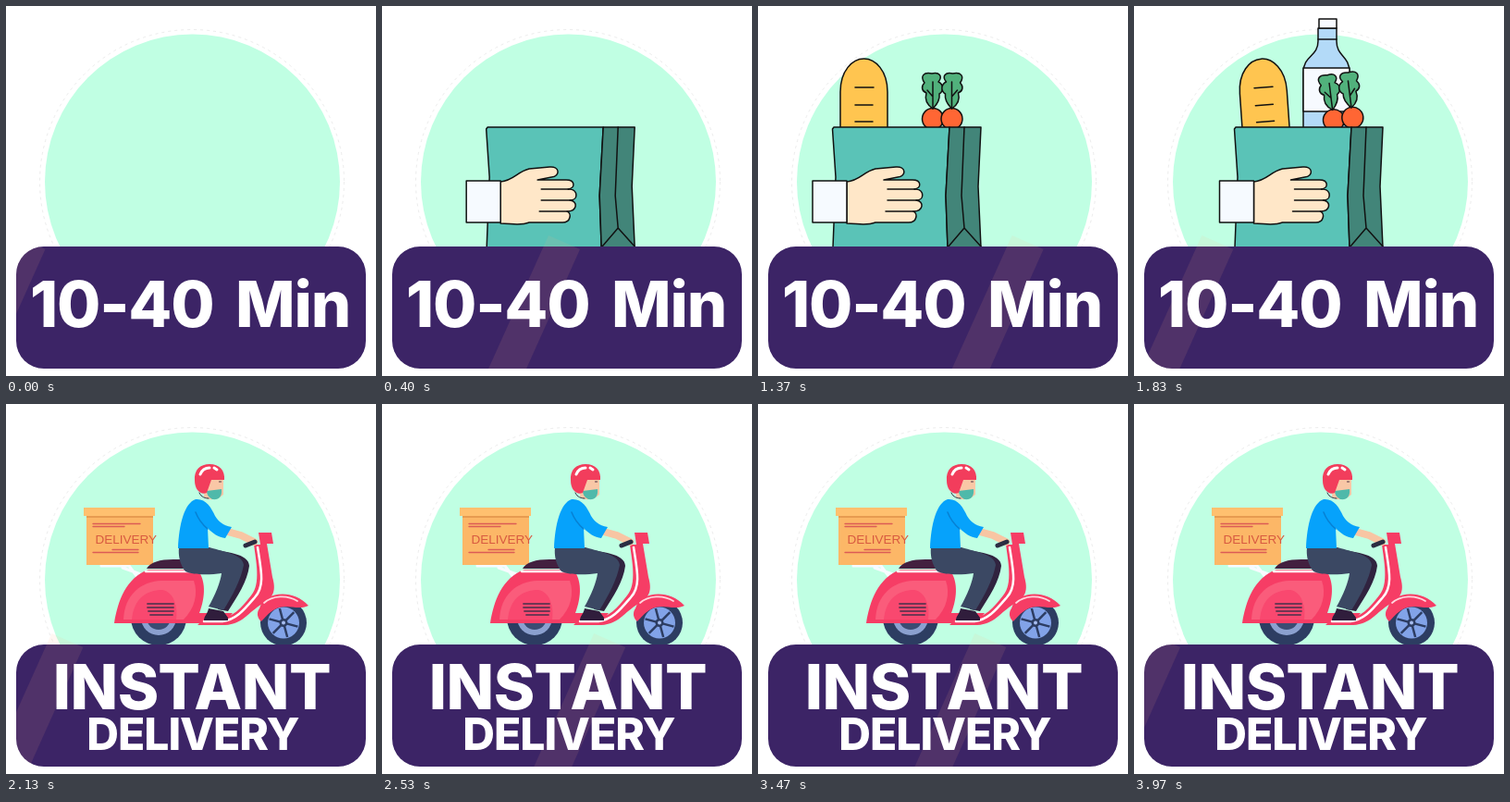
An HTML page that plays this animation: 400 by 400 pixels, repeating every 4010 ms.

```html
<!DOCTYPE html>
<html lang="en">
<head>
<meta charset="utf-8">
<title>Instant delivery</title>
<style>
  html, body { margin: 0; width: 100%; height: 100%; overflow: hidden; background: #fff; }
  svg { display: block; width: 100%; height: 100%; }
  .title { font-family: Inter, "Open Sans", sans-serif; font-weight: 800; fill: #fff; }
  .ink { stroke: #111; stroke-width: 1.5; stroke-linejoin: round; stroke-linecap: round; }
  .line { fill: none; stroke-linecap: round; stroke-linejoin: round; }
</style>
</head>
<body>
<svg viewBox="0 0 400 400">
  <defs>
    <clipPath id="shineArea"><path d="M41 240H389V362A30 30 0 0 1 359 392H41A30 30 0 0 1 11 362V290A30 30 0 0 1 41 260Z"/></clipPath>
    <clipPath id="aboveBanner"><rect width="400" height="262"/></clipPath>
    <g id="carrot">
      <circle cx="247" cy="122" r="11.5" fill="#ff6634"/>
      <path d="M247 111C241 107 238 101 240 94C235 92 234 87 238 83C233 76 237 71 246 73C254 71 258 76 253 82C259 85 259 92 254 95C255 102 251 107 247 111Z" fill="#51b17c"/>
      <path d="M247 82V111M241 91L247 98" fill="none"/>
    </g>
  </defs>

  <circle cx="201" cy="190" r="164.5" fill="none" stroke="#ececec" stroke-dasharray="3 4"/>
  <circle cx="201.500" cy="190" r="159.500" fill="#c0ffe3"/>

  <g id="groceries" clip-path="url(#aboveBanner)">
    <g id="bag" class="ink">
      <g id="bottle">
        <path d="M213 132V72C213 53 229 55 229 38V24H249V38C249 55 263 53 263 72V132Z" fill="#b3daf8"/>
        <path d="M213 67H263V114H213Z" fill="#f7faff"/>
        <path d="M230 14H249V24H230Z" fill="#f7faff"/>
        <path d="M229 36H249" fill="none"/>
      </g>
      <g id="bread">
        <path d="M147 134V93C147 70 160 57 172.500 57S198 70 198 93V134Z" fill="#ffc550"/>
        <path d="M163 88H183M163 107H182M163 125H182" fill="none"/>
      </g>
      <g id="carrots"><use href="#carrot"/><use href="#carrot" transform="matrix(-1 0 0 1 514.500 0)"/></g>
      <path d="M140 131H265L261 205 263 261H139L142 185 138.500 133Z" fill="#5ac3b7"/>
      <path d="M265 131H299L296 195 299 261H263L261 205Z" fill="#428579"/>
      <path d="M281 131L278 205 281 240M263 261L281 240 299 260" fill="none"/>
      <g id="hand">
        <path d="M154 190C168 189 172 179 185 176L207 174C218 173 219 184 209 185L194 188H225C235 188 235 197 227 198H229C238 199 238 210 229 210C238 211 237 222 226 222C231 224 230 234 221 234H185C175 238 165 235 154 235Z" fill="#ffe7c8"/>
        <path d="M198 198H228M198 210H230M196 222H226" fill="none"/>
        <path d="M117 189H154V234H117Z" fill="#f6faff"/>
      </g>
    </g>
  </g>

  <g id="scooter">
    <path class="line" d="M103 175H133L145 191M126 177L154 187" stroke="#f8fbff" stroke-width="3"/>
    <path d="M87 120H159V174H87Z" fill="#fcb767"/>
    <path d="M84 112H161V121H84Z" fill="#ffc06f"/>
    <path d="M87 121H159V123H87Z" fill="#e79b50"/>
    <path class="line" d="M94 129.500H145M94 132.500H128M94 160.500H143M115 157.500H143" stroke="#dc5c55" stroke-width="1.300"/>
    <text x="96.500" y="151" font-family="'Liberation Sans', Arial, sans-serif" font-size="13.500" fill="#d85a40">DELIVERY</text>

    <circle cx="165" cy="231" r="30" fill="#2d3d62"/>
    <circle cx="165" cy="231" r="19" fill="#8ba0cf"/>
    <circle cx="165" cy="231" r="13" fill="#3b4c73"/>
    <path d="M117 237C121 212 130 188 154 179H207C216 190 216 208 209 226H245L236 237Z" fill="#f63d65"/>
    <path d="M127 233C128 207 145 192 168 191H203C208 205 204 221 192 233Z" fill="#fa5c7b"/>
    <path d="M136 233C138 211 151 201 169 201C181 203 186 218 184 233Z" fill="#f9486f"/>
    <path class="line" d="M153 216H181M153 220H181M154 224H181M156 228H180" stroke="#713653" stroke-width="1.800"/>
    <path d="M152 178C156 171 166 168 181 168H214V178Z" fill="#43203f"/>
    <path class="line" d="M151 181H204" stroke="#fff" stroke-width="2.500"/>

    <circle cx="300" cy="236.500" r="25" fill="#2d3d62"/>
    <circle cx="300" cy="236.500" r="17" fill="#82a3e8"/>
    <g id="spokes" stroke="#2d3d62" stroke-width="2.500"></g>
    <circle cx="300" cy="236.500" r="4.500" fill="#2d3d62"/>
    <circle cx="300" cy="236.500" r="2" fill="#a7bdf0"/>
    <path d="M273 139H287L289 151H282L288 187C292 201 290 209 277 216C262 225 256 238 237 239H207L213 233H230C245 231 255 220 265 207C276 195 270 168 268 152H275Z" fill="#f63d65"/>
    <path class="line" d="M272 155C276 180 280 197 269 209C257 223 249 233 234 235H214" stroke="#fff" stroke-width="2.500"/>
    <path d="M274 221C279 203 310 199 327 218C318 222 311 219 302 219C289 219 283 228 276 235C271 231 271 225 274 221Z" fill="#f63d65"/>
    <path class="line" d="M279 215C288 207 304 206 315 213" stroke="#ffd5dd" stroke-width="1.800"/>

    <path d="M216 157C237 159 263 162 263 175C261 192 250 208 240 224L229 222C242 198 251 182 244 173Z" fill="#30233f"/>
    <path d="M187 155H220C237 160 256 163 257 174C254 190 245 207 235 223L219 219C226 207 232 192 233 183C220 185 202 185 194 181C188 174 186 163 187 155Z" fill="#3b4863"/>
    <path d="M219 221L235 224 240 231V234H214C214 229 218 227 219 221Z" fill="#301d3c"/>
    <path class="line" d="M236 137L254 142 268 149" stroke="#f8c5a3" stroke-width="8"/>
    <path class="line" d="M259 153L269 149" stroke="#2b2d42" stroke-width="5"/>
    <path d="M205 103C193 107 187 130 186 156H219L218 134C223 140 230 144 237 145L244 133C234 131 230 127 226 121C222 112 216 102 205 103Z" fill="#06a2fb"/>
    <path class="line" d="M205 117C208 125 212 130 218 135" stroke="#0780d3" stroke-width="1.500"/>
    <path d="M215 80H235V98C229 104 218 105 214 100Z" fill="#f9c7a6"/>
    <path d="M230 84H233" stroke="#4c3444"/>
    <path d="M217 94L233 92C234 100 230 104 223 103C219 101 217 98 217 94Z" fill="#4fb9aa"/>
    <path d="M204 83C203 71 210 65 220 65C231 65 237 72 236 82L222 82 217 96C210 99 204 92 204 83Z" fill="#f23d5c"/>
    <path class="line" d="M210 76C212 71 216 69 220 69M225 69L228 71" stroke="#fff" stroke-width="3"/>
    <path class="line" d="M209 96C211 101 216 102 219 102" stroke="#2b2d42"/>
  </g>

  <rect x="11" y="260" width="378" height="132" rx="30" fill="#3c2466"/>
  <g clip-path="url(#shineArea)"><path id="shine" d="M0 248L34 263L-32 410L-73 410Z" fill="#ffb080" opacity=".1"/></g>

  <g id="timeTitle" class="title" font-size="68.500" letter-spacing="-1.200">
    <text x="26" y="347">10-40</text>
    <text x="372" y="347" text-anchor="end">Min</text>
  </g>
  <g id="deliveryTitle" class="title" text-anchor="middle">
    <text x="201" y="330" font-size="67.500" letter-spacing="-.5">INSTANT</text>
    <text x="202" y="374" font-size="48" letter-spacing="-1">DELIVERY</text>
  </g>
</svg>

<script>
const LOOP = 4010;
const CUT = 2000;
const $ = id => document.getElementById(id);

const SHINE = [[0, 8], [1000, 437], [2010, -5], [3000, 440], [LOOP, -1]];
const BAG_X = [[300, -30], [730, 0], [1260, -58], [1520, -58], [1830, -30]];
const LEAN = [[1560, 0], [1800, -1], [1850, -1], [2000, 0]];

const linear = p => p;
const smooth = p => p * p * (3 - 2 * p);
const clamp = p => Math.min(1, Math.max(0, p));

function track(keys, t, ease = smooth) {
  if (t <= keys[0][0]) return keys[0][1];
  const i = keys.findIndex(([time]) => time > t);
  if (i < 0) return keys[keys.length - 1][1];
  const [t0, a] = keys[i - 1], [t1, b] = keys[i];
  return a + (b - a) * ease((t - t0) / (t1 - t0));
}

function place(id, x, y, turn = "") {
  $(id).setAttribute("transform", `translate(${x} ${y}) ${turn}`);
}

function show(id, on) {
  $(id).style.display = on ? "" : "none";
}

// Items appear near the top edge and fall into the bag.
function drop(id, t, start, end, height, turn) {
  const p = clamp((t - start) / (end - start));
  show(id, t >= start);
  place(id, 0, -height * (1 - p * p), turn);
}

function render(t) {
  const delivery = t >= CUT;
  show("groceries", !delivery && t >= 30);
  show("timeTitle", !delivery);
  show("scooter", delivery);
  show("deliveryTitle", delivery);
  place("shine", track(SHINE, t, linear), 0);
  if (delivery) return;

  const lean = track(LEAN, t);
  const rise = clamp((t - 30) / 300);
  place("bag", track(BAG_X, t), 135 * (1 - rise) ** 3);
  place("hand", -5.5 * lean, 0);
  drop("carrots", t, 430, 640, 68, `rotate(${7 * lean} 257 131)`);
  drop("bread", t, 1020, 1240, 54, `rotate(${4 * lean} 172 131)`);
  drop("bottle", t, 1570, 1770, 60, "");
}

$("spokes").innerHTML = [0, 60, 120]
  .map(a => `<path d="M284 236.500H316" transform="rotate(${a + 15} 300 236.500)"/>`).join("");

function tick(now) {
  render(now % LOOP);
  requestAnimationFrame(tick);
}
render(0);
requestAnimationFrame(tick);
</script>
</body>
</html>
```
